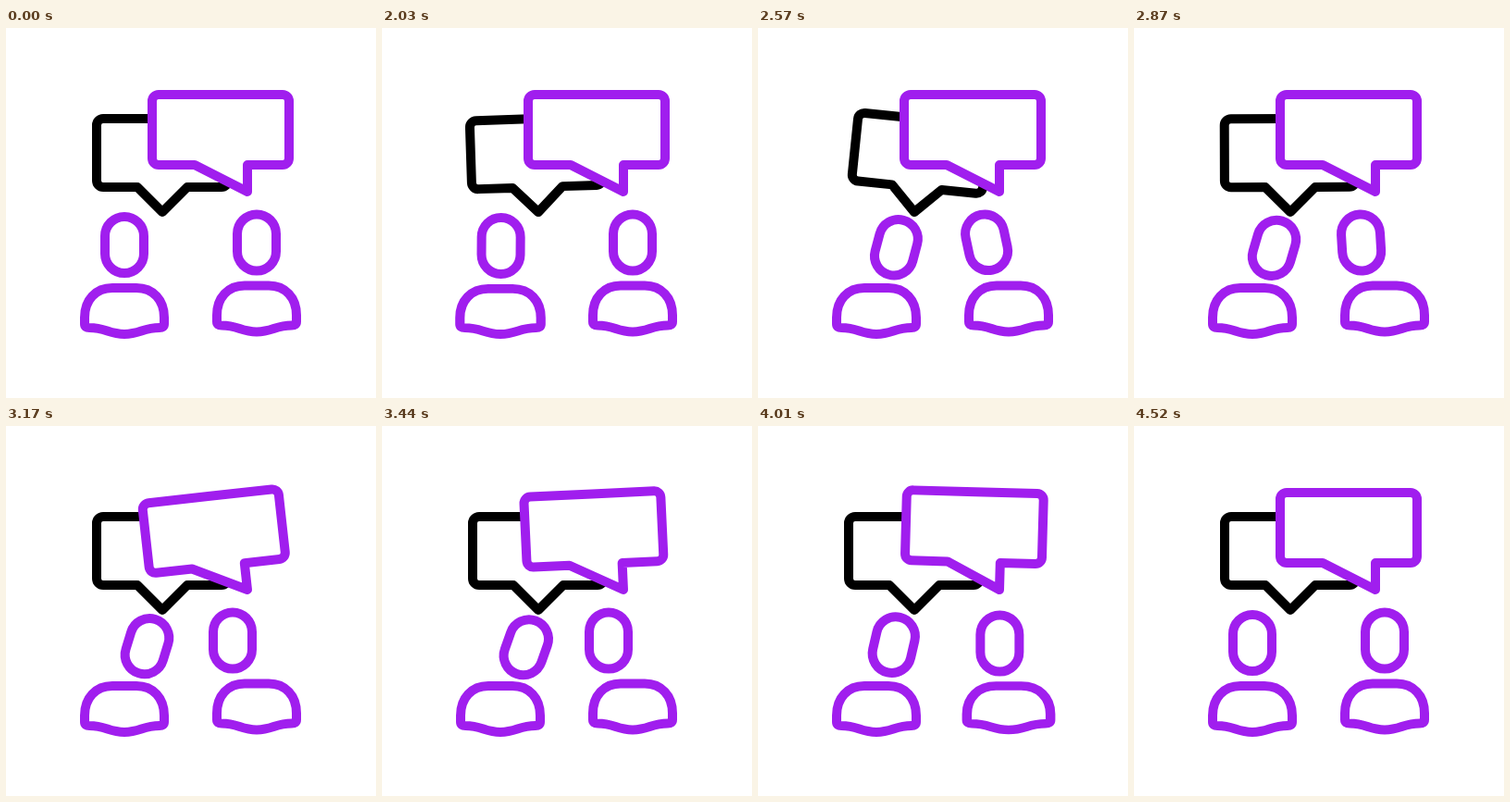
An HTML page with a canvas for the animation above (4.55 s loop, 400x400 px).

```html
<!DOCTYPE html>
<html lang="en">
<head>
<meta charset="utf-8">
<title>Conversation</title>
<style>
  html, body { margin: 0; width: 100%; height: 100%; overflow: hidden; background: #fff; }
  canvas { display: block; width: 400px; height: 400px; }
</style>
</head>
<body>
<canvas id="stage" width="400" height="400"></canvas>
<script>
const ctx = document.getElementById('stage').getContext('2d');
const LOOP = 4550, STEP = 30;
const PURPLE = '#a01eee', BLACK = '#000';

// Keys are [time, value] pairs, joined by sine easing.
const SWING = [[0, 0], [168, -20.5], [493, 14.3], [688, -9], [988, 4], [1133, 0]];
const LEFT_LEAN = [[1995, 0], [2300, 13], [2480, 13], [2720, 19], [3045, 13],
                   [3330, 23], [3600, 13], [4080, 13], [4500, 0]];
const RIGHT_SHIFT = [[2080, 0], [2400, -26], [3870, -26], [4110, 0]];
const RIGHT_TILT = [[2350, 0], [2550, -12.2], [3050, 0]];

function at(keys, t) {
  if (t <= keys[0][0]) return keys[0][1];
  for (let i = 1; i < keys.length; i++) {
    const [t0, a] = keys[i - 1], [t1, b] = keys[i];
    if (t < t1) return a + (b - a) * (1 - Math.cos(Math.PI * (t - t0) / (t1 - t0))) / 2;
  }
  return keys[keys.length - 1][1];
}

// One soft push from start to end, 0 outside it.
function pulse(t, start, end) {
  return t > start && t < end ? Math.sin(Math.PI * (t - start) / (end - start)) : 0;
}

function rotateAbout(x, y, degrees) {
  ctx.translate(x, y);
  ctx.rotate(degrees * Math.PI / 180);
  ctx.translate(-x, -y);
}

function isolated(draw) {
  ctx.save();
  draw();
  ctx.restore();
}

// Rounded rectangle with a pointed tail on its lower edge.
function bubble(left, top, right, bottom, tail, color, angle) {
  const r = 7;
  isolated(() => {
    rotateAbout(tail[1][0], tail[1][1], angle);
    ctx.beginPath();
    ctx.moveTo((left + right) / 2, top);
    ctx.arcTo(right, top, right, bottom, r);
    ctx.arcTo(right, bottom, left, bottom, r);
    tail.forEach(([x, y]) => ctx.lineTo(x, y));
    ctx.arcTo(left, bottom, left, top, r);
    ctx.arcTo(left, top, right, top, r);
    ctx.closePath();
    ctx.fillStyle = '#fff';
    ctx.fill();
    ctx.strokeStyle = color;
    ctx.stroke();
  });
}

function head(x, y) {
  ctx.beginPath();
  ctx.roundRect(x - 21, y - 30.5, 42, 61, 21);
  ctx.stroke();
}

// Shoulders centred on x, squashed against the base line.
function body(x, base, squash) {
  isolated(() => {
    ctx.translate(x, base);
    ctx.scale(1 + squash, 1 - squash);
    ctx.beginPath();
    ctx.moveTo(-43, -18);
    ctx.bezierCurveTo(-43, -37, -31, -50, -13, -50);
    ctx.lineTo(13, -50);
    ctx.bezierCurveTo(31, -50, 43, -37, 43, -18);
    ctx.lineTo(43, -11);
    ctx.quadraticCurveTo(43, -7, 38, -7);
    ctx.bezierCurveTo(20, -7, 17, 0, 0, 0);
    ctx.bezierCurveTo(-17, 0, -20, -7, -38, -7);
    ctx.quadraticCurveTo(-43, -7, -43, -11);
    ctx.closePath();
    ctx.stroke();
  });
}

function draw(t) {
  ctx.fillStyle = '#fff';
  ctx.fillRect(0, 0, 400, 400);
  ctx.lineWidth = 10;
  ctx.lineJoin = ctx.lineCap = 'round';

  bubble(98, 98, 240, 172, [[196, 172], [169, 199], [142, 172]], BLACK, at(SWING, t - 1997));
  bubble(158, 72, 306, 148, [[261, 148], [261, 177], [204, 148]], PURPLE, at(SWING, t - 3107));

  ctx.strokeStyle = PURPLE;
  const leftPush = pulse(t, 1995, 2260) + pulse(t, 4080, 4400);
  const rightPush = pulse(t, 2080, 2380) + pulse(t, 3870, 4140);

  body(128, 331, 0.042 * leftPush);
  isolated(() => {
    rotateAbout(128, 318, at(LEFT_LEAN, t));
    head(128, 234.5 + 2.5 * leftPush);
  });

  body(271, 328.5, 0.05 * rightPush);
  isolated(() => {
    ctx.translate(at(RIGHT_SHIFT, t), 3 * rightPush);
    rotateAbout(271, 222, at(RIGHT_TILT, t));
    head(271, 232);
  });
}

function frame(now) {
  const t = now % LOOP;
  draw(Math.floor((t - 20) / STEP) * STEP + 20);
  requestAnimationFrame(frame);
}
requestAnimationFrame(frame);
</script>
</body>
</html>
```
